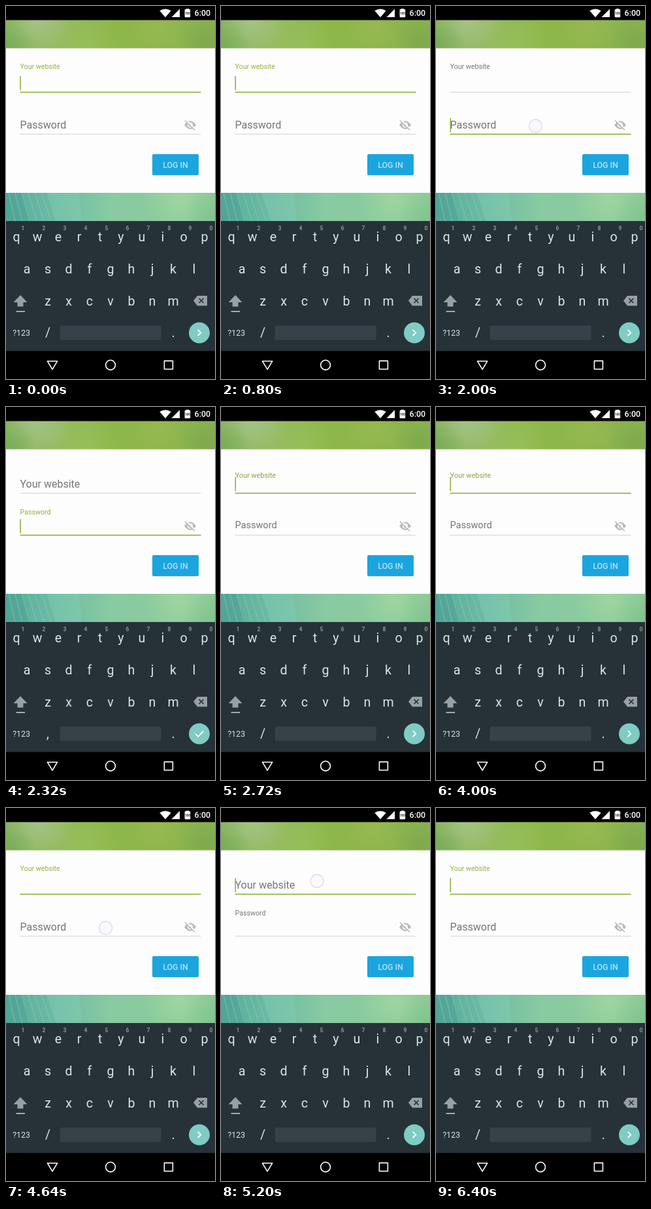
Animation of 320x569 px, one loop 6.8 s. Source, as an HTML page with a canvas:

```html
<!DOCTYPE html>
<html lang="en">
<head>
<meta charset="utf-8">
<title>Floating label login</title>
<style>
html, body { margin: 0; width: 100%; height: 100%; overflow: hidden; background: #000; }
canvas { display: block; width: 320px; height: 569px; }
</style>
</head>
<body>
<canvas id="stage"></canvas>
<script>
const W = 320, H = 569, LOOP = 6800, STEP = 80;
const canvas = document.getElementById('stage');
const ratio = window.devicePixelRatio || 1;
canvas.width = W * ratio;
canvas.height = H * ratio;
const ctx = canvas.getContext('2d');

const GREEN = [143, 179, 60], GREY = [117, 117, 117];
const FONT = 'Roboto, sans-serif';

// Each tap moves the focus; `press` is when the finger becomes visible.
const taps = [
  { press: 1760, at: 2000, field: 'password' },
  { press: 2400, at: 2560, field: 'website' },
  { press: 3040, at: 3200, field: 'password' },
  { press: 3680, at: 3840, field: 'website' },
  { press: 4480, at: 4720, field: 'password' },
  { press: 5120, at: 5200, field: 'website' }
];
const cursorGaps = [[400, 800], [1280, 1680], [4400, 4720], [6000, 6400]];
const fields = {
  website: { text: 'Your website', high: 95.8, low: 123, line: 131.5, cursor: 107, touch: [147, 111.5] },
  password: { text: 'Password', high: 164, low: 187, line: 195.5, cursor: 171, touch: [152.5, 183] }
};

const clamp = v => Math.min(1, Math.max(0, v));
const lerp = (a, b, k) => a + (b - a) * k;
const rgb = c => `rgb(${c.map(Math.round).join(',')})`;

// cubic-bezier(.4, 0, .2, 1)
function fastOutSlowIn(x) {
  if (x <= 0 || x >= 1) return clamp(x);
  let lo = 0, hi = 1;
  for (let i = 0; i < 24; i++) {
    const t = (lo + hi) / 2, u = 1 - t;
    if (1.2 * t * u * u + 0.6 * t * t * u + t * t * t < x) lo = t; else hi = t;
  }
  return lo * lo * (3 - 2 * lo);
}

function rect(x, y, w, h, color) {
  ctx.fillStyle = color;
  ctx.fillRect(x, y, w, h);
}

function roundRect(x, y, w, h, r, color) {
  ctx.beginPath();
  ctx.roundRect(x, y, w, h, r);
  ctx.fillStyle = color;
  ctx.fill();
}

function trace(points, close) {
  ctx.beginPath();
  points.forEach(([x, y]) => ctx.lineTo(x, y));
  if (close) ctx.closePath();
}

function polygon(points, color) {
  trace(points, true);
  ctx.fillStyle = color;
  ctx.fill();
}

function stroke(color, width) {
  ctx.strokeStyle = color;
  ctx.lineWidth = width;
  ctx.stroke();
}

function polyline(points, color, width, close) {
  trace(points, close);
  stroke(color, width);
}

function disc(x, y, r, color) {
  ctx.beginPath();
  ctx.arc(x, y, r, 0, Math.PI * 2);
  ctx.fillStyle = color;
  ctx.fill();
}

function text(str, x, y, size, color, align = 'center', weight = 400) {
  ctx.font = `${weight} ${size}px ${FONT}`;
  ctx.textAlign = align;
  ctx.fillStyle = color;
  ctx.fillText(str, x, y);
}

function gradient(x0, y0, x1, y1, colors) {
  const g = ctx.createLinearGradient(x0, y0, x1, y1);
  colors.forEach((c, i) => g.addColorStop(i / (colors.length - 1), c));
  return g;
}

function glow(x, y, r, color) {
  const g = ctx.createRadialGradient(x, y, 0, x, y, r);
  g.addColorStop(0, `rgba(${color},.6)`);
  g.addColorStop(1, `rgba(${color},0)`);
  rect(x - r, y - r, 2 * r, 2 * r, g);
}

function clipped(y, h, paint) {
  ctx.save();
  ctx.beginPath();
  ctx.rect(0, y, W, h);
  ctx.clip();
  paint();
  ctx.restore();
}

function drawBackdrop() {
  clipped(21, 44, () => {
    rect(0, 21, W, 44, gradient(0, 0, W, 0, ['#88b45e', '#95ba62', '#8fb84a', '#8cb54c', '#8ab252']));
    glow(48, 22, 52, '178,203,158');
    glow(5, 62, 40, '112,168,84');
    glow(120, 60, 50, '152,194,92');
    glow(235, 30, 45, '158,187,84');
    glow(305, 55, 40, '118,164,72');
  });
  clipped(285, 43, () => {
    rect(0, 285, W, 43, gradient(0, 0, W, 0, ['#58ad9c', '#6dbba4', '#88caa2', '#8acb9c', '#8ecb96']));
    polygon([[0, 285], [24, 285], [38, 328], [0, 328]], 'rgba(70,152,142,.4)');
    for (let i = 0; i < 6; i++) {
      polyline([[4 + i * 10, 285], [14 + i * 11, 328]], 'rgba(150,212,190,.3)', 2);
    }
    polygon([[62, 285], [112, 285], [116, 328], [76, 328]], 'rgba(134,205,180,.4)');
    glow(265, 292, 55, '170,220,164');
    glow(315, 325, 45, '120,192,138');
  });
}

function drawStatusBar() {
  rect(0, 0, W, 21.5, '#000');
  ctx.beginPath();
  ctx.moveTo(244, 17.2);
  ctx.lineTo(235.3, 7.3);
  ctx.quadraticCurveTo(244, 1.6, 252.7, 7.3);
  ctx.fillStyle = '#fff';
  ctx.fill();
  polygon([[253.5, 17], [266, 17], [266, 4.5]], '#fff');
  rect(276, 4, 4, 2, '#fff');
  roundRect(273.6, 5, 8.6, 12.2, 1, '#fff');
  text('100', 277.9, 13.2, 4.5, '#222', 'center', 700);
  text('6:00', 313, 15.4, 12.4, '#fff', 'right', 500);
}

function drawEye(x, y) {
  const color = '#b9b9b9';
  ctx.beginPath();
  ctx.moveTo(x - 9, y);
  ctx.quadraticCurveTo(x, y - 12.6, x + 9, y);
  ctx.quadraticCurveTo(x, y + 12.6, x - 9, y);
  ctx.fillStyle = color;
  ctx.fill();
  disc(x, y, 4.1, '#fefdfe');
  disc(x, y, 2.5, color);
  polyline([[x - 7, y - 8.2], [x + 8.3, y + 7]], '#fefdfe', 2);
  polyline([[x - 8, y - 7], [x + 7, y + 7.8]], color, 1.5);
}

function drawField(name, focused, lift) {
  const f = fields[name];
  const size = lerp(16, 10.67, fastOutSlowIn(lift));
  const color = focused ? GREY.map((g, i) => lerp(g, GREEN[i], lift)) : GREY;
  text(f.text, 21.5, lerp(f.low, f.high, lift * lift), size, rgb(color), 'left');
  if (focused) rect(21.5, f.line - 0.8, 277, 1.7, rgb(GREEN));
  else rect(21.5, f.line - 0.4, 277, 0.9, '#d0d0d0');
}

function drawTouch(t) {
  const tap = taps.find(p => t >= p.press && t < p.at + STEP);
  if (!tap) return;
  const [x, y] = fields[tap.field].touch;
  ctx.globalAlpha = t < tap.press + STEP && t < tap.at - STEP ? 0.6 : 1;
  disc(x, y, 10, 'rgba(246,244,250,.5)');
  stroke('#dfdbea', 1.4);
  ctx.globalAlpha = 1;
}

function drawForm(t) {
  rect(0, 64.5, W, 220.5, '#fefdfe');
  const tap = taps.filter(p => p.at <= t).pop();
  const focus = tap ? tap.field : 'website';
  const progress = tap ? fastOutSlowIn(clamp((t - tap.at - 66) / 200)) : 1;
  for (const name of Object.keys(fields)) {
    drawField(name, name === focus, name === focus ? progress : 1 - progress);
  }
  if (!cursorGaps.some(([a, b]) => t >= a && t < b)) {
    rect(21.3, fields[focus].cursor, 1.6, 21.5, rgb(GREEN));
  }
  drawEye(282, 181.5);
  roundRect(224, 226.8, 71, 32, 2, 'rgba(0,0,0,.12)');
  roundRect(224, 226, 71, 32, 2, '#1ba5de');
  text('LOG IN', 259.5, 246.8, 12.4, '#b4e1f5', 'center', 500);
  drawTouch(t);
  return focus === 'password' && t >= tap.at + STEP;
}

function drawKeyboard(passwordMode) {
  const key = '#dfe3e5', dim = '#98a0a4', panel = '#263238';
  rect(0, 328, W, 198.5, panel);
  [['qwertyuiop', 16, 358.7], ['asdfghjkl', 32, 407.7], ['zxcvbnm', 64, 456.7]].forEach(([row, x, y]) =>
    [...row].forEach((c, i) => text(c, x + i * 32, y, 19.6, key)));
  [...'1234567890'].forEach((c, i) => text(c, 26 + i * 32, 341.8, 8.5, '#8b959a', 'center', 700));

  polygon([[22, 441], [32.5, 452], [26.5, 452], [26.5, 458.5], [17.5, 458.5], [17.5, 452], [11.5, 452]], dim);
  rect(15.5, 465.2, 13.5, 1.6, '#c3c9cc');

  polygon([[287, 449.5], [293, 442], [308, 442], [308, 457.3], [293, 457.3]], dim);
  polyline([[295.5, 446], [302.5, 453]], panel, 1.7);
  polyline([[302.5, 446], [295.5, 453]], panel, 1.7);

  text('?123', 23.5, 503, 12.4, key);
  text(passwordMode ? ',' : '/', 64, 505.3, 19.6, key);
  roundRect(82.5, 487.5, 155, 22, 3, '#364249');
  text('.', 256, 505.3, 19.6, key);

  disc(296, 498.5, 16, '#80cbc4');
  polyline(passwordMode
    ? [[290, 498.7], [294.2, 502.8], [302.3, 494.4]]
    : [[293.6, 493.8], [298.3, 498.4], [293.6, 503]], '#fff', 1.8);
}

function drawNavBar() {
  rect(0, 526.5, W, 42.5, '#000');
  ctx.lineJoin = 'round';
  polyline([[63.5, 541.8], [78.5, 541.8], [71, 554.3]], '#fff', 1.6, true);
  ctx.beginPath();
  ctx.arc(160, 547.7, 7.4, 0, Math.PI * 2);
  stroke('#fff', 1.6);
  ctx.strokeRect(242.4, 541.4, 13, 12.6);
  ctx.lineJoin = 'miter';
}

function render(time) {
  const t = Math.floor((time % LOOP) / STEP) * STEP;
  ctx.setTransform(ratio, 0, 0, ratio, 0, 0);
  drawBackdrop();
  drawStatusBar();
  drawKeyboard(drawForm(t));
  drawNavBar();
}

const start = performance.now();
function tick() {
  render(performance.now() - start);
  requestAnimationFrame(tick);
}
tick();
</script>
</body>
</html>
```
